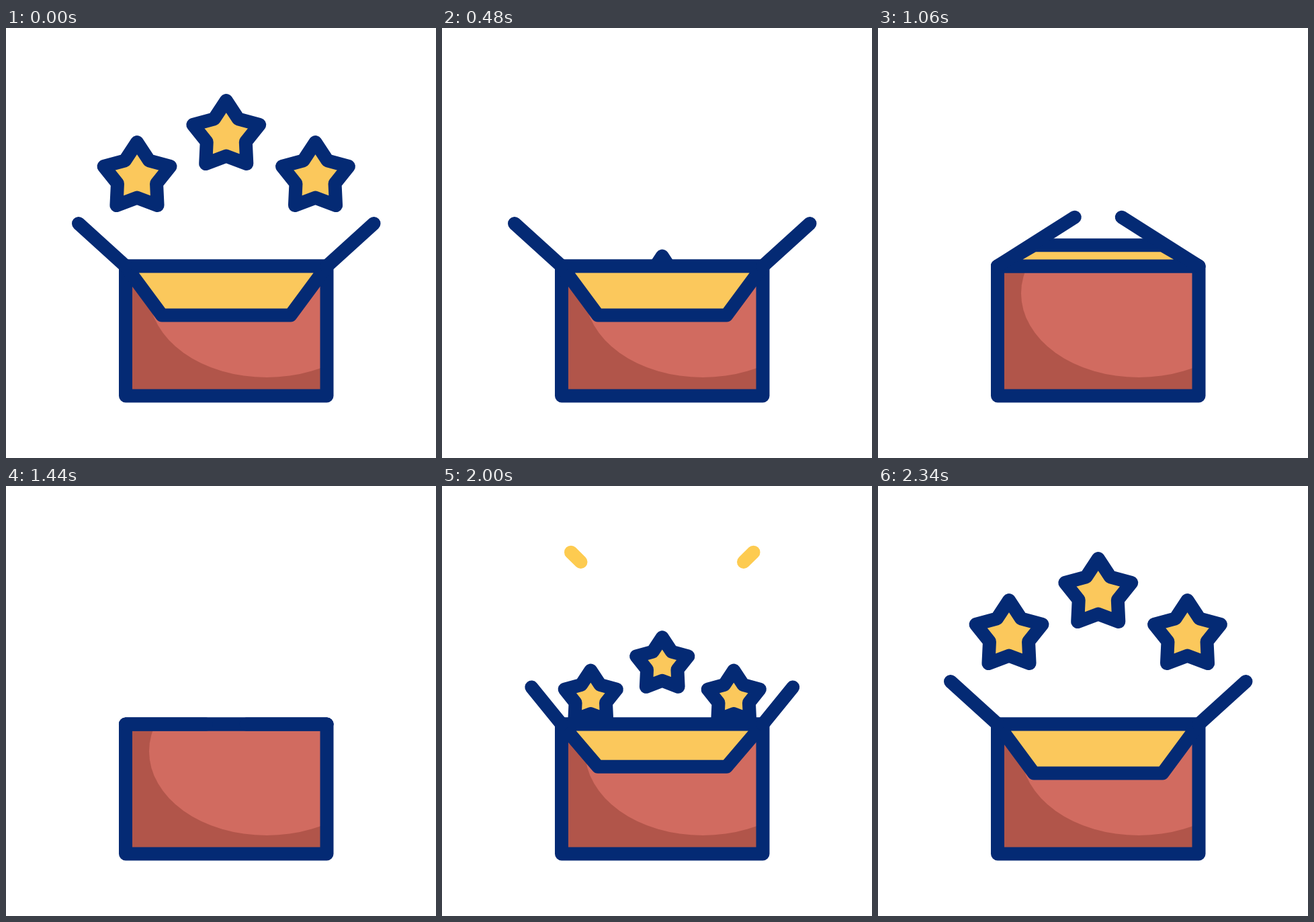
These frames come from a looping animation (640x640 px, 2.4 s). An HTML page with a canvas:

```html
<!DOCTYPE html>
<html lang="en">
<head>
<meta charset="utf-8">
<title>Star box</title>
<style>
  html, body { margin: 0; height: 100%; overflow: hidden; background: #fff; }
  canvas { display: block; }
</style>
</head>
<body>
<canvas id="stage" width="640" height="640"></canvas>
<script>
const ctx = document.getElementById('stage').getContext('2d');
const LOOP = 2400;
const CENTER = 327.75, LEFT = 178, RIGHT = 477.5, TOP = 354.5, BOTTOM = 547.5;
const NAVY = '#042a74', GOLD = '#fbc85c', SPARK = '#fdcb50', RED = '#d16b60', SHADE = '#b1554a';

const mix = (a, b, k) => a + (b - a) * k;

// Eased progress between two times, clamped to 0..1
function ease(t, from, to) {
  const k = Math.min(1, Math.max(0, (t - from) / (to - from)));
  return k * k * (3 - 2 * k);
}

// Keys are [time, ...values]; values are eased from key to key
function track(t, keys) {
  let i = 0;
  while (i < keys.length - 2 && t >= keys[i + 1][0]) i++;
  const [from, ...a] = keys[i], [to, ...b] = keys[i + 1];
  const k = ease(t, from, to);
  return a.map((v, n) => mix(v, b[n], k));
}

function shape(points, { stroke = NAVY, fill, closed = false }) {
  ctx.beginPath();
  points.forEach(([x, y]) => ctx.lineTo(x, y));
  if (closed) ctx.closePath();
  if (fill) {
    ctx.fillStyle = fill;
    ctx.fill();
  }
  ctx.strokeStyle = stroke;
  ctx.stroke();
}

function mirrored(draw) {
  draw();
  ctx.save();
  ctx.translate(2 * CENTER, 0);
  ctx.scale(-1, 1);
  draw();
  ctx.restore();
}

function star(x, y, radius) {
  const points = Array.from({ length: 10 }, (_, i) => {
    const a = (i * 36 - 90) * Math.PI / 180;
    const r = i % 2 ? radius * 0.587 : radius;
    return [x + r * Math.cos(a), y + r * Math.sin(a)];
  });
  shape(points, { fill: GOLD, closed: true });
}

function stars(t) {
  const sunk = t < 1500 ? ease(t, 60, 660) : 1 - ease(t, 1660, 2260);
  const radius = mix(52, 23.5, sunk);
  star(CENTER, mix(160, 426, sunk), radius);
  mirrored(() => star(mix(195, 261, sunk), mix(222, 456, sunk), radius));
}

function sparks(t) {
  const head = ease(t, 1920, 2120), tail = ease(t, 2060, 2260);
  if (head === 0 || tail === 1) return;
  const at = k => [mix(206.5, 166, k), mix(113, 73, k)];
  mirrored(() => shape([at(tail), at(head)], { stroke: SPARK }));
}

function box() {
  const w = RIGHT - LEFT, h = BOTTOM - TOP;
  ctx.save();
  ctx.beginPath();
  ctx.rect(LEFT, TOP, w, h);
  ctx.clip();
  ctx.fillStyle = SHADE;
  ctx.fillRect(LEFT, TOP, w, h);
  ctx.fillStyle = RED;
  ctx.beginPath();
  ctx.ellipse(388, 395, 175, 125, 0, 0, 2 * Math.PI);
  ctx.fill();
  ctx.restore();
  ctx.strokeStyle = NAVY;
  ctx.strokeRect(LEFT, TOP, w, h);
}

function lid(t) {
  // Tip of the side flap, then the edge of the front flap
  const open = [108, 291, 427.5], raised = [296, 281.5, 321.5], shut = [298, TOP, TOP];
  const [x, y, edge] = track(t, [
    [600, ...open], [1100, ...raised], [1440, ...shut], [1600, ...shut], [2120, ...open]
  ]);
  shape([[LEFT, TOP], [232, edge], [2 * CENTER - 232, edge], [RIGHT, TOP]], { fill: GOLD, closed: true });
  mirrored(() => shape([[LEFT, TOP], [x, y]], {}));
}

function frame() {
  const t = performance.now() % LOOP;
  ctx.clearRect(0, 0, 640, 640);
  ctx.lineWidth = 20;
  ctx.lineCap = ctx.lineJoin = 'round';
  sparks(t);
  stars(t);
  box();
  lid(t);
  requestAnimationFrame(frame);
}
frame();
</script>
</body>
</html>
```
